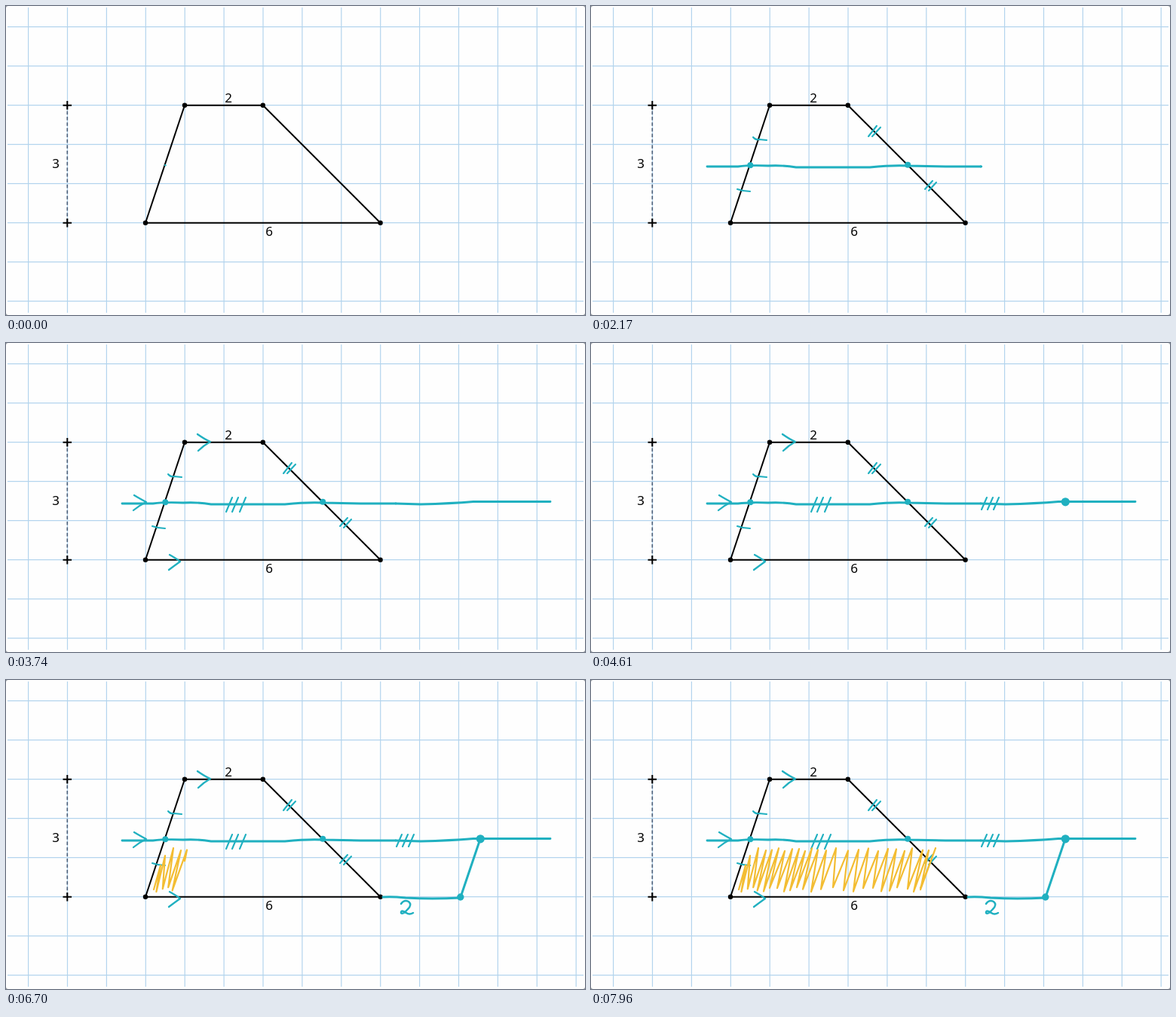
An HTML page that plays this animation: 768 px wide and 410 px high, repeating every 8 s.

```html
<!DOCTYPE html>
<html lang="en">
<head>
<meta charset="utf-8">
<title>Trapezium area sketch</title>
<style>
  html, body { margin: 0; width: 100%; height: 100%; overflow: hidden; background: #fff; }
  svg { display: block; width: 100%; height: 100%; }
  text { font: 17px "Noto Sans", "Open Sans", sans-serif; text-anchor: middle; }
  #ink path { fill: none; stroke-linecap: round; stroke-linejoin: round; }
</style>
</head>
<body>
<svg viewBox="0 0 768 410">
  <rect width="768" height="410" fill="#8a8f94"/>
  <rect width="768" height="410" rx="3" fill="#fefefe"/>
  <path id="grid" fill="none" stroke="#b3d4ed" stroke-width="1.2"/>
  <path d="M81.3 132V288" fill="none" stroke="#4d6079" stroke-width="1.6" stroke-dasharray="4.5 3"/>
  <path d="M75.5 131.7h11.6m-5.8-5.8v11.6M75.5 287.7h11.6m-5.8-5.8v11.6" stroke="#000" stroke-width="2"/>
  <path d="M185 287.7L237 131.7H340.8L496.6 287.7Z" fill="none" stroke="#000" stroke-width="2"/>
  <path d="M185 287.7h0M237 131.7h0M340.8 131.7h0M496.6 287.7h0" stroke="#000" stroke-width="6.4" stroke-linecap="round"/>
  <text x="295" y="128">2</text>
  <text x="66" y="214.5">3</text>
  <text x="349" y="305">6</text>
  <g id="ink"></g>
</svg>
<script>
const LOOP = 8000, TEAL = '#20b0c0', YELLOW = '#f3bd33';
const ink = document.getElementById('ink');

let grid = '';
for (let i = 0; i < 15; i++) grid += `M${29.6 + i * 51.9} 2V407`;
for (let i = 0; i < 8; i++) grid += `M2 ${27.7 + i * 52}H766`;
document.getElementById('grid').setAttribute('d', grid);

const parts = [];

function add(tag, attrs, start, end, update) {
  const el = document.createElementNS('http://www.w3.org/2000/svg', tag);
  for (const name in attrs) el.setAttribute(name, attrs[name]);
  ink.append(el);
  parts.push({ el, start, end, update });
}

function stroke(d, start, end, width = 2.1, color = TEAL) {
  add('path', { d, pathLength: 1, stroke: color, 'stroke-width': width }, start, end,
    (el, p) => el.setAttribute('stroke-dasharray', `${p} 2`));
}

function dot(cx, cy, r, start, end) {
  add('circle', { cx, cy, fill: TEAL }, start, end,
    (el, p) => el.setAttribute('r', 1 + (r - 1) * p));
}

// Midpoints and equal-length ticks
dot(211.3, 211.3, 4, -30, 260);
dot(420.2, 210.8, 4, 430, 720);
stroke('M194 243Q202 246 211 246', 800, 900);
stroke('M215 174Q218 178 223 177L233 178', 935, 1060);
stroke('M368 173L379 159', 1170, 1240);
stroke('M373 173L384 161', 1290, 1360);
stroke('M443 243L453 232', 1440, 1510);
stroke('M448 245L458 234', 1560, 1630);

// Midline
stroke('M154 213H195Q210 211 235 212Q255 211 272 214H370Q400 211 420 212L470 213H517', 1740, 2170, 2.9);
stroke('M517 213L550 214Q590 213 620 210.5H722', 2170, 2440, 2.9);

// Parallel arrows
stroke('M254 121Q264 128 271 131Q262 136 255 143', 2560, 2750, 2.3);
stroke('M170 202Q180 208 186 211Q176 216 169 222', 2820, 3010, 2.3);
stroke('M217 281Q226 286 231 290Q224 295 216 301', 3080, 3270, 2.3);

// Triple ticks
[292, 300, 310].forEach((x, i) => stroke(`M${x} 224L${x + 8} 205`, 3370 + i * 120, 3450 + i * 120));
[518, 526, 534].forEach((x, i) => stroke(`M${x} 221L${x + 7} 205`, 3830 + i * 110, 3900 + i * 110));

// Rotated copy
dot(629.3, 210.8, 5.6, 4250, 4520);
dot(602.8, 288, 4.7, 4680, 4930);
stroke('M629 211L603 288', 5080, 5380, 3);
stroke('M500 288Q512 287 530 289Q565 291 603 289', 5520, 5800, 3);
stroke('M524 297Q528 291 534 294Q539 298 533 304Q526 312 524 309Q524 304 531 309Q535 312 540 309', 5920, 6240, 2.5);

// Shading: a zigzag leaning right
const tops = [205, 211, 222, 232, 240, 249, 257, 267, 276, 284, 293, 301, 312,
  325, 341, 355, 368, 381, 394, 405, 416, 426, 440, 448, 457];
const hatch = tops.map((x, i) => {
  const lean = Math.min(20, 9 + i * 2.6);
  const top = i < 2 ? 246 - i * 13 : 225 + 2 * Math.sin(i * 2.3);
  return `${i ? 'L' : 'M'}${x - lean} ${278 + 3 * Math.sin(i * 1.7)}L${x} ${top}`;
}).join('') + 'L437 276';
stroke(hatch, 6450, 7960, 2.2, YELLOW);

function draw(now) {
  const t = now % LOOP;
  for (const { el, start, end, update } of parts) {
    const p = Math.min(1, (t - start) / (end - start));
    el.style.display = p > 0 ? '' : 'none';
    if (p > 0) update(el, p);
  }
}

const began = performance.now();
function tick() {
  draw(performance.now() - began);
  requestAnimationFrame(tick);
}
tick();
</script>
</body>
</html>
```
